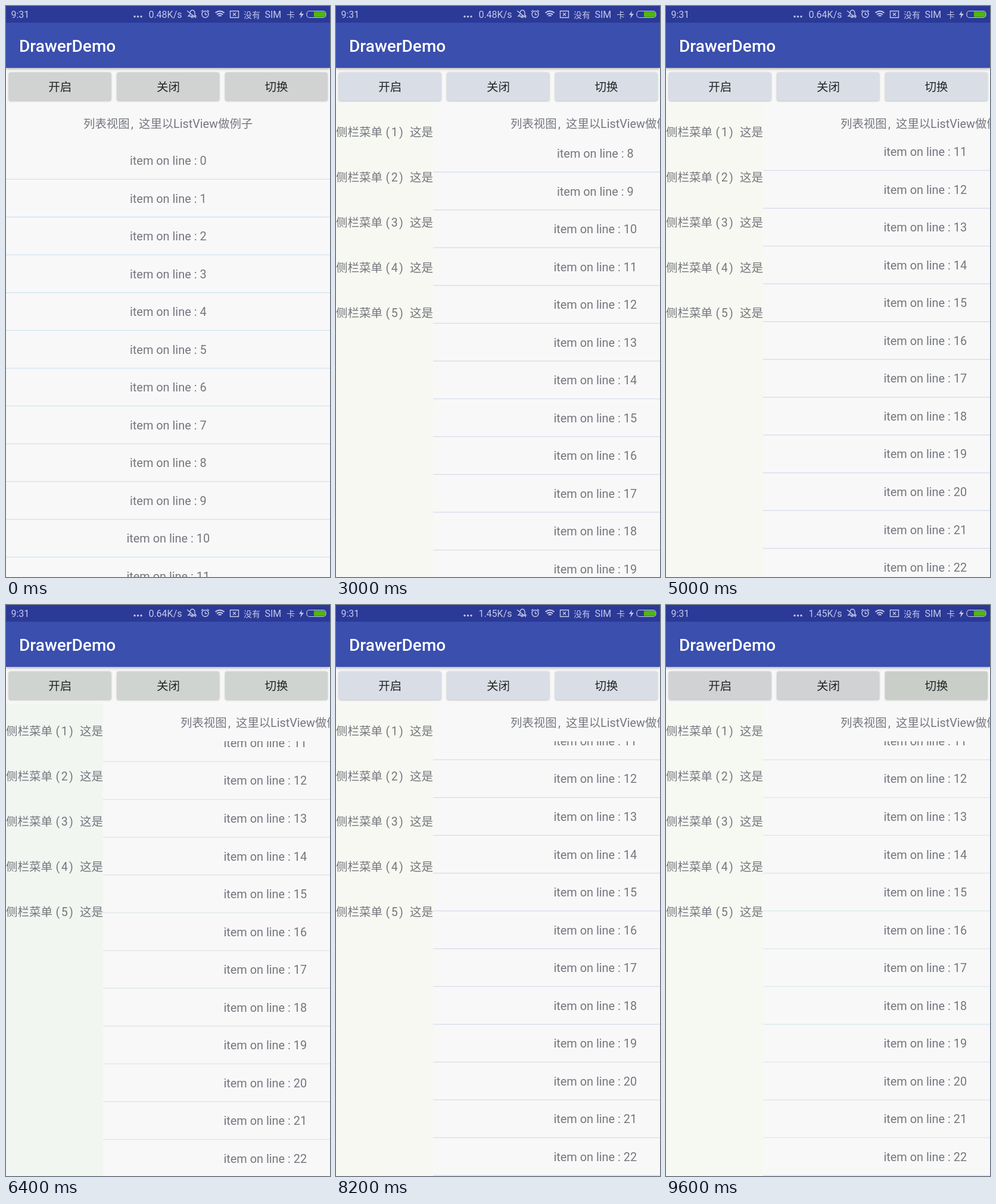
An HTML page with a canvas for the animation above (9.8 s loop, 544 px wide and 960 px high).

```html
<!DOCTYPE html>
<html lang="zh-CN">
<head>
<meta charset="utf-8">
<title>DrawerDemo</title>
<style>
html, body { margin: 0; width: 100%; height: 100%; overflow: hidden; background: #f8f8f8; }
canvas { display: block; }
</style>
</head>
<body>
<canvas width="544" height="960"></canvas>
<script>
const ctx = document.querySelector('canvas').getContext('2d');
const LOOP = 9800, STEP = 200, ROW = 63.53, LIST_TOP = 229;
const FAMILY = 'Roboto, "Noto Sans CJK SC", "Noto Sans CJK", sans-serif';
const GREY = '#74777e', ICON = '#c3c9ea';

// [time, value] keys
const drawerKeys = [[1200, 0], [1600, 149.3], [1800, 163]];
const scrollKeys = [[2000, 0], [4000, 1040.5], [5000, 713.6], [6400, 726.9], [6800, 729.9]];
// [start time, value], held until the next entry
const speeds = [[0, '0.48K/s'], [4200, '0.64K/s'], [8200, '1.45K/s']];
const tints = [
  [0, { button: '#d0d3d1', line: '#d2e5ee', drawer: '#f7f8f1' }],
  [800, { button: '#d9dee6', line: '#d8deeb', drawer: '#f7f8f1' }],
  [6000, { button: '#d0d4d0', line: '#dde7e5', drawer: '#f1f6f1' }],
  [7000, { button: '#d9dee6', line: '#d8deeb', drawer: '#f7f8f1' }],
  [9400, { button: '#d0d2d4', line: '#dce8ec', drawer: '#f6f8f2', pressed: '#c9cec8' }]
];

const held = (list, t) => list.filter(([start]) => start <= t).pop()[1];

function track(keys, t, ease = u => u) {
  if (t <= keys[0][0]) return keys[0][1];
  for (let i = 1; i < keys.length; i++) {
    const [t0, a] = keys[i - 1], [t1, b] = keys[i];
    if (t <= t1) return a + (b - a) * ease((t - t0) / (t1 - t0));
  }
  return keys[keys.length - 1][1];
}

const smooth = u => u * u * (3 - 2 * u);

function rect(x, y, w, h, color) {
  ctx.fillStyle = color;
  ctx.fillRect(x, y, w, h);
}

function text(str, x, y, size, color, align = 'left', weight = 400) {
  ctx.font = `${weight} ${size}px ${FAMILY}`;
  ctx.fillStyle = color;
  ctx.textAlign = align;
  ctx.fillText(str, x, y);
}

function stroke(path, color = ICON, width = 1.4) {
  ctx.strokeStyle = color;
  ctx.lineWidth = width;
  ctx.stroke(new Path2D(path));
}

function shadow(color, blur, y) {
  ctx.shadowColor = color;
  ctx.shadowBlur = blur;
  ctx.shadowOffsetY = y;
}

function clipped(x, y, w, h, draw) {
  ctx.save();
  ctx.beginPath();
  ctx.rect(x, y, w, h);
  ctx.clip();
  draw();
  ctx.restore();
}

function drawDrawer(color) {
  rect(0, 166, 163, 794, color);
  for (let i = 1; i <= 5; i++) {
    const y = 143 + i * 76;
    text('侧栏菜单', 0, y, 19.5, GREY);
    text('(', 83.5, y, 19.5, GREY);
    text(i, 98.3, y, 19.5, GREY, 'center');
    text(')', 106, y, 19.5, GREY);
    text('这是', 124, y, 19.5, GREY);
  }
}

function drawList(x, scroll, line) {
  rect(x, 166, 544, 794, '#f8f8f8');
  text('列表视图', x + 130, 205, 19.4, GREY);
  text(',', x + 210, 205, 19.8, GREY);
  text('这里以', x + 223, 205, 19.4, GREY);
  text('ListView', x + 281, 205, 19.8, GREY);
  text('做例子', x + 356, 205, 19.4, GREY);
  clipped(x, LIST_TOP, 544, 960 - LIST_TOP, () => {
    const first = Math.floor(scroll / ROW);
    for (let i = first; i < first + 13; i++) {
      const y = 260 + i * ROW - scroll;
      text('item on line : ' + i, x + 272.3, y + 7, 19.9, GREY, 'center');
      rect(x, y + 30.6, 544, 1.4, line);
    }
  });
}

function drawButtons(tint) {
  rect(0, 104, 544, 62, '#f8f8f8');
  ['开启', '关闭', '切换'].forEach((label, i) => {
    const x = 4.5 + i * 181.7;
    ctx.save();
    shadow('rgba(0,0,0,.25)', 3, 1);
    ctx.fillStyle = i === 2 && tint.pressed || tint.button;
    ctx.beginPath();
    ctx.roundRect(x, 111.5, 172, 47.5, 3);
    ctx.fill();
    ctx.restore();
    text(label, x + 86.2, 143, 19.5, '#222426', 'center');
  });
}

function drawStatus(speed) {
  rect(0, 0, 544, 28, '#2b3997');
  text('9:31', 8.5, 20, 16, ICON);
  for (const x of [216, 221.5, 227]) {
    ctx.beginPath();
    ctx.arc(x, 17.8, 1.7, 0, 7);
    ctx.fill();
  }
  text(speed, 295.5, 20, 16, ICON, 'right');
  // muted bell, alarm, wifi, empty SIM
  stroke('M306 17l3-3v-3q1-4 4-4t4 4v4l2 2zM310 19h5M304 8l15 12');
  stroke('M340 14a5.5 5.5 0 1 1-11 0a5.5 5.5 0 1 1 11 0M334.5 11v3.5h3M328 9.5l3-2.5M341 9.5l-3-2.5');
  stroke('M351.5 11.5q7.5-6 15 0M354 14.5q5-4 10 0M356.5 17q2.5-2 5 0', ICON, 1.9);
  stroke('M376.5 8.5h14v11h-14zM381 11.5l5 5M386 11.5l-5 5');
  text('没有', 399, 19.5, 14, ICON);
  text('SIM', 434.5, 20, 16, ICON);
  text('卡', 471, 19.5, 14, ICON);
  ctx.fill(new Path2D('M497 8l-5 7h3.5l-1.5 6l6-8h-4z'));
  ctx.strokeStyle = ICON;
  ctx.lineWidth = 1.2;
  ctx.beginPath();
  ctx.roundRect(505, 8.5, 32, 11, 4.5);
  ctx.stroke();
  ctx.fillStyle = '#4fb80f';
  ctx.beginPath();
  ctx.roundRect(517, 9.5, 19, 9, [0, 3.5, 3.5, 0]);
  ctx.fill();
}

function drawHeader(speed) {
  ctx.save();
  shadow('rgba(0,0,0,.4)', 5, 1);
  rect(0, 27, 544, 77, '#3a4fae');
  ctx.restore();
  text('DrawerDemo', 22, 77, 28, '#fff', 'left', 500);
  drawStatus(speed);
}

function frame(now) {
  const t = Math.floor(now % LOOP / STEP) * STEP;
  const tint = held(tints, t);
  drawDrawer(tint.drawer);
  drawList(track(drawerKeys, t), track(scrollKeys, t, smooth), tint.line);
  drawButtons(tint);
  drawHeader(held(speeds, t));
  requestAnimationFrame(frame);
}
requestAnimationFrame(frame);
</script>
</body>
</html>
```
